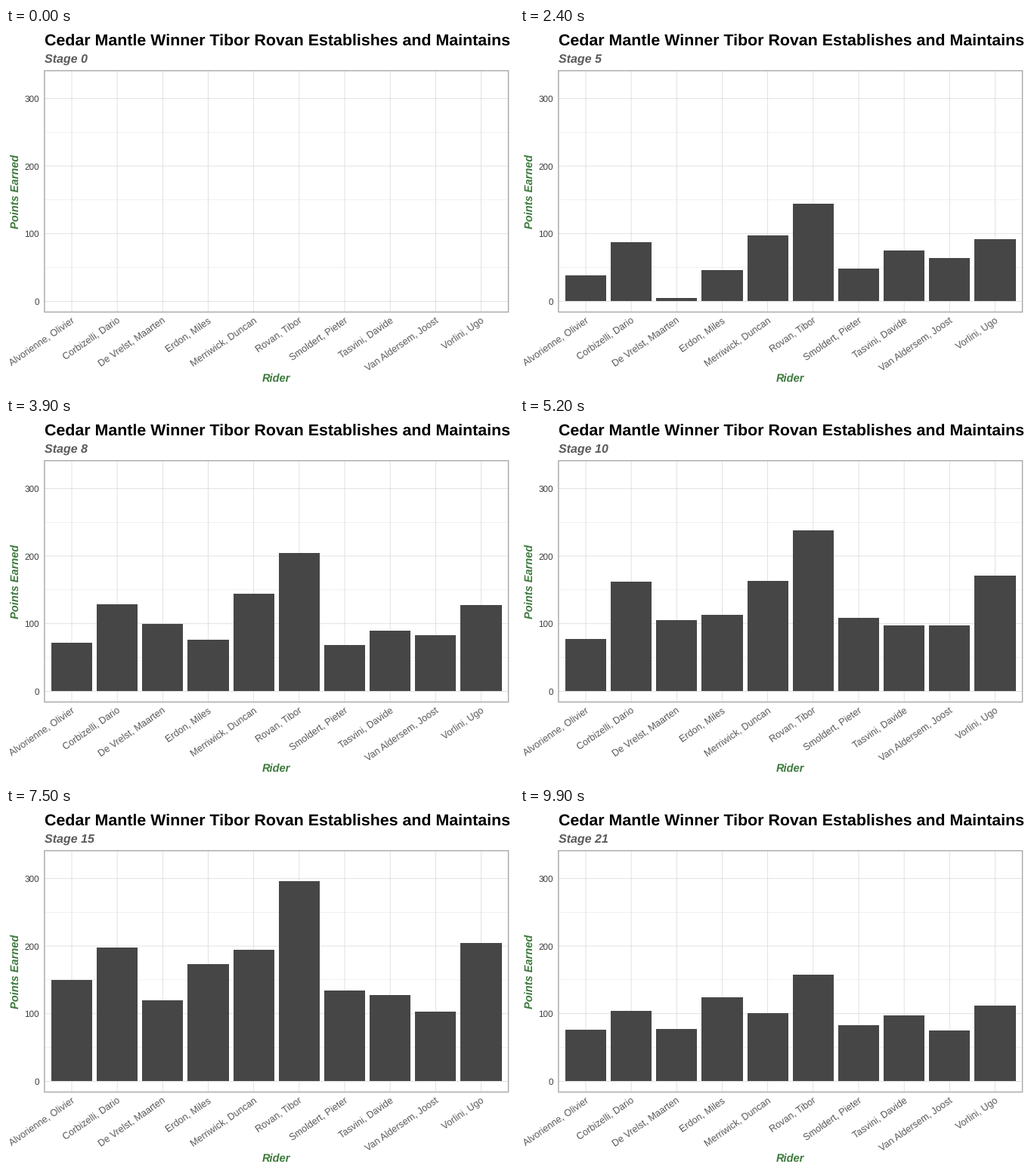
Animation of 672x480 px, one loop 10 s. Source, as a matplotlib script:

```python
import numpy as np
import matplotlib.pyplot as plt
from matplotlib.animation import FuncAnimation
from matplotlib.patches import Rectangle

W, H, DPI = 672, 480, 96
FRAMES, INTERVAL = 100, 100
LAST = 21

RIDERS = {
    "A": "Alvorienne, Olivier", "C": "Corbizelli, Dario",
    "D": "De Vrelst, Maarten", "E": "Erdon, Miles",
    "M": "Merriwick, Duncan", "R": "Rovan, Tibor",
    "S": "Smoldert, Pieter", "T": "Tasvini, Davide",
    "V": "Van Aldersem, Joost", "U": "Vorlini, Ugo",
}

# Points gained on each stage that changed the standings
GAINS = {
    1: dict(C=33, E=20, M=24, R=50, S=7, T=21, V=22, U=10),
    3: dict(A=30, C=21, M=34, R=26, S=22, T=17, V=20, U=8),
    4: dict(C=10, E=26, M=17, R=27, S=11, T=12, V=5, U=65),
    5: dict(A=8, C=23, D=5, M=22, R=41, S=8, T=25, V=17, U=9),
    6: dict(A=12, D=19),
    7: dict(C=28, E=30, M=21, R=33, S=12, V=6, U=31),
    8: dict(A=22, C=14, D=76, M=26, R=27, S=8, T=15, V=13, U=5),
    9: dict(D=5, S=28),
    10: dict(A=5, C=28, E=20, M=18, R=25, S=9, T=8, V=14, U=36),
    11: dict(C=17, E=52, M=5, R=28, S=10, U=20),
    12: dict(C=17, R=20, S=17, T=21, V=6),
    13: dict(A=20, D=15),
    14: dict(A=48, R=7),
    15: dict(A=5, M=20),
    16: dict(C=13, E=50, M=14, R=25, S=5, T=17, U=40),
    17: dict(D=24, S=19, T=47, V=32),
    18: dict(A=2, V=16),
    21: dict(C=5, D=10, E=50, R=7, S=10, T=12),
}

totals = np.cumsum([[GAINS.get(s, {}).get(r, 0) for r in RIDERS]
                    for s in range(LAST + 1)], axis=0)
totals = np.vstack([totals, totals[0]])  # closes the loop

# Panel geometry in pixels
LEFT, RIGHT, TOP, BOTTOM = 50.9, 664.6, 56.6, 376.6
ZERO, SCALE = 362.4, 0.8967
UNIT = (RIGHT - LEFT) / 10.2
BAR = 0.9 * UNIT
centers = LEFT + UNIT * (0.6 + np.arange(len(RIDERS)))

GREEN, GRID = "#3d7a3d", "#d7d7d7"
MAJOR, MINOR, BORDER = 0.533, 0.267, 1.067

plt.rcParams.update({"font.family": "Liberation Sans", "text.hinting": "none"})
fig = plt.figure(figsize=(W / DPI, H / DPI), dpi=DPI, facecolor="white")
ax = fig.add_axes([0, 0, 1, 1])
ax.set_xlim(0, W)
ax.set_ylim(H, 0)
ax.axis("off")


def y_of(points):
    return ZERO - points * SCALE


def line(xs, ys, lw):
    ax.plot(xs, ys, color=GRID, lw=lw, solid_capstyle="butt", snap=False,
            zorder=1)


def label(x, y, s, size, color, **kw):
    return ax.text(x, y, s, fontsize=size, color=color, va="baseline",
                   rotation_mode="anchor", **kw)


for v in (50, 150, 250):
    line([LEFT, RIGHT], [y_of(v)] * 2, MINOR)
for v in (0, 100, 200, 300):
    line([LEFT, RIGHT], [y_of(v)] * 2, MAJOR)
    label(44.2, y_of(v) + 4.4, str(v), 8.8, "#404040", ha="right")
for x, name in zip(centers, RIDERS.values()):
    line([x, x], [TOP, BOTTOM], MAJOR)
    label(x + 5, 390, name, 9.5, "#595959", ha="right", rotation=35)

ax.add_patch(Rectangle((LEFT, TOP), RIGHT - LEFT, BOTTOM - TOP, fill=False,
                       ec="#a8a8a8", lw=BORDER, snap=False, zorder=4))

heading = dict(weight="bold", style="italic")
label(51, 23, "Cedar Mantle Winner Tibor Rovan Establishes and Maintains",
      16, "black", weight="bold")
subtitle = label(51, 46, "Stage 0", 12, "#5a5a5a", **heading)
label((LEFT + RIGHT) / 2, 470, "Rider", 11, GREEN, ha="center", **heading)
label(18, 217, "Points Earned", 11, GREEN, ha="center", rotation=90, **heading)

bars = [ax.add_patch(Rectangle((x - BAR / 2, ZERO), BAR, 0, fc="#464646",
                               lw=0, snap=True, zorder=3)) for x in centers]


def arrival(stage):
    return 5 * stage - 1 if stage <= 13 else 4 * stage + 12


def draw(n):
    stage = max(s for s in range(LAST + 1) if arrival(s) <= n)
    steps = 3 if stage < 13 else 2
    t = max(0, 1 - (arrival(stage + 1) - n) / steps)
    points = totals[stage] + t * (totals[stage + 1] - totals[stage])
    for bar, p in zip(bars, points):
        bar.set_height(-p * SCALE)
        bar.set_visible(p > 0)
    subtitle.set_text(f"Stage {stage}")
    return [*bars, subtitle]


anim = FuncAnimation(fig, draw, frames=FRAMES, interval=INTERVAL,
                     repeat=True, repeat_delay=0, blit=False)
plt.show()
```
